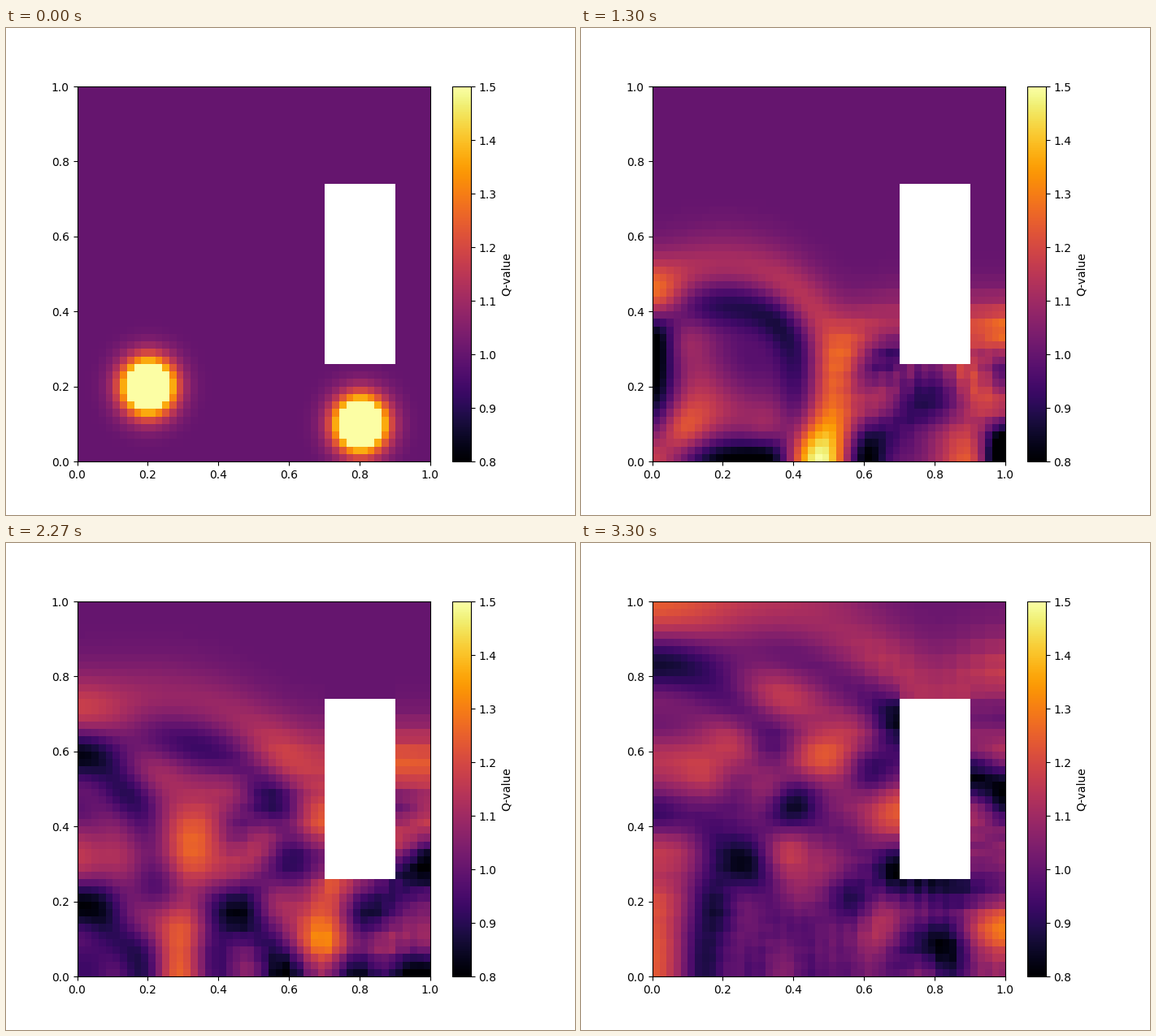
These frames come from a looping animation (700 px wide and 600 px high, 3.33 s). A matplotlib script:

```python
import matplotlib.pyplot as plt
import numpy as np
from matplotlib.animation import FuncAnimation

CELLS = 50
DX = 1 / CELLS
DT = 0.008
FRAMES = 100
LOOP_MS = 3330

mid = (np.arange(CELLS) + 0.5) * DX
X, Y = np.meshgrid(mid, mid)
solid = (X > 0.7) & (X < 0.9) & (Y > 0.25) & (Y < 0.75)

# Which neighbours, by axis and direction, lie inside a wall or the block
padded = np.pad(solid, 1, constant_values=True)
wall = {
    (axis, step): np.roll(padded, -step, axis)[1:-1, 1:-1]
    for axis in (0, 1)
    for step in (-1, 1)
}


def bump(x, y, width=0.05):
    return np.exp(-((X - x) ** 2 + (Y - y) ** 2) / (2 * width**2))


def neighbour(q, axis, step, sign):
    """Next cell's value, mirrored at reflecting walls."""
    return np.where(wall[axis, step], sign * q, np.roll(q, -step, axis))


def slope(q, axis, sign):
    ahead = neighbour(q, axis, 1, sign)
    behind = neighbour(q, axis, -1, sign)
    return (ahead - behind) / (2 * DX)


def rates(state):
    h, u, v = state
    return np.array([
        -slope(u, 1, -1) - slope(v, 0, -1),
        -slope(h, 1, 1),
        -slope(h, 0, 1),
    ])


def advance(state):
    k1 = rates(state)
    k2 = rates(state + DT / 2 * k1)
    k3 = rates(state + DT / 2 * k2)
    k4 = rates(state + DT * k3)
    return state + DT / 6 * (k1 + 2 * k2 + 2 * k3 + k4)


def simulate():
    still = np.zeros_like(X)
    state = np.array([1 + bump(0.2, 0.2) + bump(0.8, 0.1), still, still])
    heights = []
    for _ in range(FRAMES):
        state = advance(state)
        heights.append(np.ma.array(state[0], mask=solid))
    return heights


heights = simulate()

fig, ax = plt.subplots(figsize=(7, 6), dpi=100)
image = ax.imshow(heights[0], cmap="inferno", vmin=0.8, vmax=1.5,
                  origin="lower", extent=(0, 1, 0, 1), aspect="auto")
fig.colorbar(image, ax=ax, label="Q-value")


def draw(i):
    image.set_data(heights[i])
    return [image]


anim = FuncAnimation(fig, draw, frames=FRAMES, interval=LOOP_MS / FRAMES, repeat=True)
plt.show()
```
